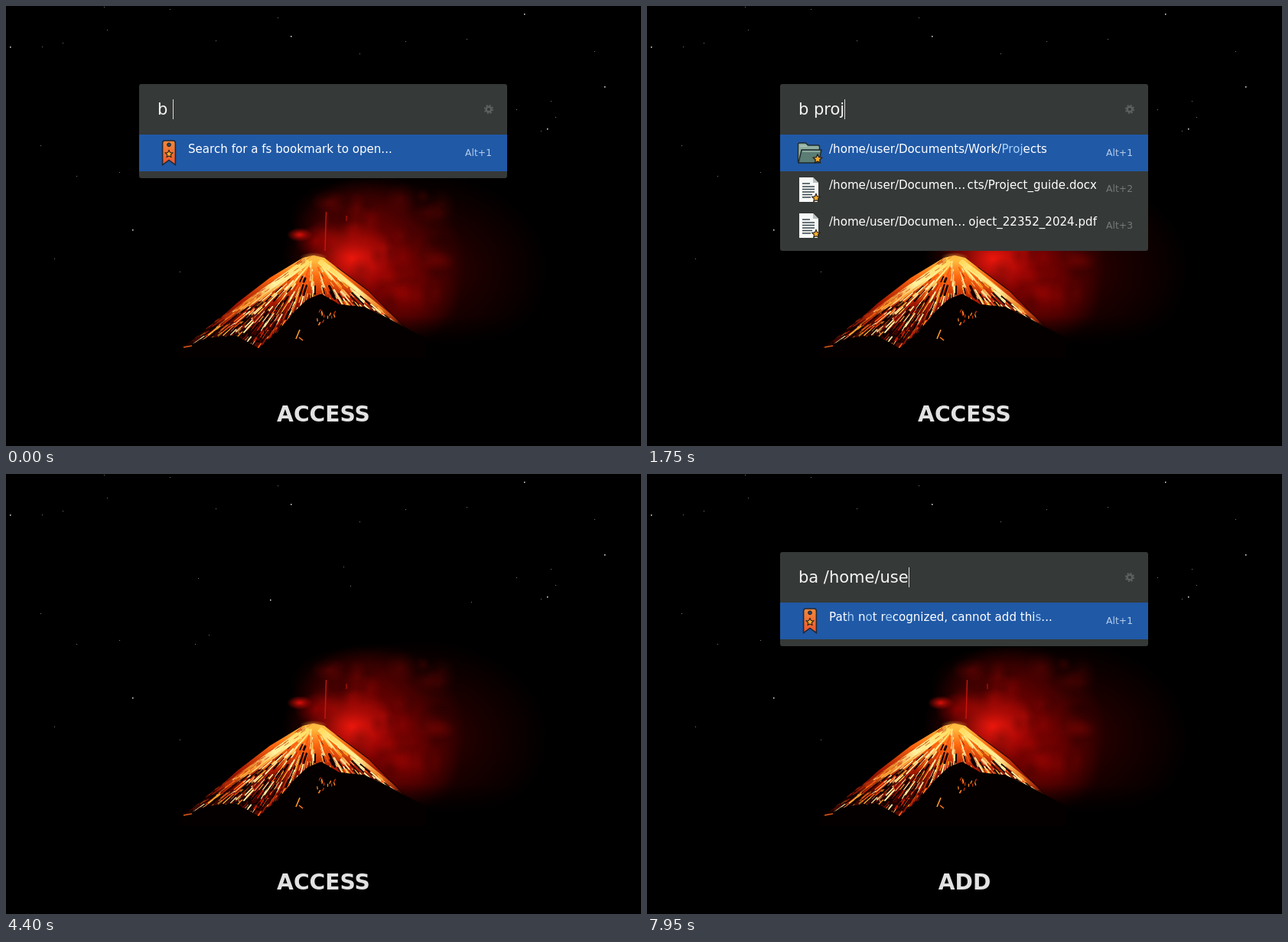
Animation of 830 by 575 pixels, one loop 8000 ms. Source, as an HTML page with a canvas:

```html
<!DOCTYPE html>
<html lang="en">
<head>
<meta charset="utf-8">
<title>Bookmark launcher</title>
<style>
html, body { margin: 0; width: 100%; height: 100%; overflow: hidden; background: #000; }
#stage { position: relative; width: 830px; height: 575px; overflow: hidden; font-family: "DejaVu Sans", sans-serif; color: #fff; }
canvas, #panel, #query, #gear, .row > *, #files, .file, .file > *, #caption { position: absolute; }
#query, .row span, .file p { white-space: pre; }
[hidden] { display: none; }
#panel { left: 174px; top: 102px; width: 481px; padding: 66px 0 9px; border-radius: 3px; background: #353938; overflow: hidden; }
#query { left: 24px; top: 18px; font-size: 21px; line-height: 30px; color: #f4f4f4; }
#query::after { content: ""; display: inline-block; width: 1.2px; height: 26px; margin-right: -2px; vertical-align: -6px; background: #d8dad9; }
#gear { left: 450px; top: 26px; }
.row { position: relative; height: 47.6px; font-size: 15.1px; line-height: 20px; }
.row:first-child { background: #2059a6; }
.row svg { left: 22px; top: 7px; width: 34px; height: 34px; }
.row .path { left: 64px; top: 8.6px; }
.row .tail { right: 67px; top: 8.6px; }
.row .key { left: 426px; top: 13.6px; font-size: 12.4px; color: #747978; }
.row:first-child .key { color: #b4cdec; }
.row b { font-weight: normal; color: #a5d0f8; }
#files { inset: 0; background: linear-gradient(125deg, #161417 45%, #171512); }
.file { top: 0; width: 104px; }
.file svg { left: 0; top: 0; }
.file p { margin: 0; left: 0; width: 104px; top: 78.6px; text-align: center; font-size: 12.4px; line-height: 15.4px; }
#caption { left: 0; top: 514px; width: 830px; text-align: center; font-size: 28.2px; font-weight: bold; line-height: 40px; color: #e2e2e2; }
</style>
</head>
<body>
<svg width="0" height="0" style="position:absolute">
  <defs>
    <linearGradient id="ribbon" x2="0" y2="1">
      <stop stop-color="#f28a3c"/><stop offset="1" stop-color="#f0552f"/>
    </linearGradient>
    <polygon id="star" points="0,-5 1.5,-1.9 4.8,-1.5 2.3,.8 2.9,4 0,2.4 -2.9,4 -2.3,.8 -4.8,-1.5 -1.5,-1.9" fill="#fbae2c" stroke="#26211c" stroke-width="1.1"/>
    <symbol id="bookmark" viewBox="0 0 34 34">
      <path d="M8.6 4q0-3 3-3h10.8q3 0 3 3v28.6L17 26.4l-8.4 6.2z" fill="url(#ribbon)" stroke="#202a38" stroke-width="1.6"/>
      <circle cx="17" cy="6.3" r="2.4" fill="#2c4560" stroke="#202020"/>
      <use href="#star" x="17" y="18.5"/>
    </symbol>
    <symbol id="folder" viewBox="0 0 34 34">
      <path d="M1.5 28V6q0-2 2-2h8l3 3h13q2 0 2 2v19z" fill="#8fae9f" stroke="#1e2a2c" stroke-width="1.4"/>
      <path d="M2 30L6 13h26l-3.5 17z" fill="#5b7d74" stroke="#1e2a2c" stroke-width="1.4"/>
      <path d="M7 15h23M4 8h9" stroke="#b9d3c5"/>
      <use href="#star" transform="translate(27 25) scale(1.2)"/>
    </symbol>
    <symbol id="doc" viewBox="0 0 34 34">
      <path d="M3 1h18l7 7v25H3z" fill="#f7f8f8"/>
      <path d="M21 1v7h7z" fill="#b9c0c3"/>
      <path d="M7 9h10M7 13h16M7 16.5h16M7 20h16M7 23.5h13M7 27h11" stroke="#38454c" stroke-width="1.5"/>
      <use href="#star" transform="translate(25 28) scale(1.1)"/>
    </symbol>
  </defs>
</svg>
<div id="stage">
  <canvas id="scene" width="830" height="575"></canvas>
  <div id="panel">
    <div id="query"></div>
    <svg id="gear" width="14" height="14" viewBox="-7 -7 14 14" fill="none" stroke="#5c6160">
      <circle r="3.3" stroke-width="2.4"/><circle r="5.2" stroke-width="1.8" stroke-dasharray="2.04"/>
    </svg>
    <div id="rows"></div>
  </div>
  <div id="files" hidden></div>
  <div id="caption"></div>
</div>
<script>
const $ = id => document.getElementById(id);

function random(seed) {
  return () => (seed = (seed * 16807) % 2147483647) / 2147483647;
}

// ---------- night sky and volcano ----------
const STARS = [5,53, 355,15, 372,39, 274,45, 677,10, 782,105, 712,124, 707,160, 699,163, 667,135, 345,164,
  251,136, 450,146, 165,292, 227,347, 92,222, 148,217, 265,210, 247,222, 602,43, 769,59, 47,53, 74,48,
  132,31, 214,4, 128,1, 63,330, 45,182, 441,121, 608,167, 718,145, 462,62, 522,46];
const BRIGHT = new Set([5, 677, 782, 707, 345, 372, 165]);
const LAVA = [402,326, 388,329, 345,355, 302,388, 272,415, 232,446, 262,434, 300,430, 330,447, 354,427,
  374,402, 394,383, 412,376, 436,390, 468,393, 500,408, 521,420, 474,373, 434,343, 416,329];
const CONE = [402,327, 434,342, 474,372, 522,420, 548,434, 548,460, 225,460, 225,447, 300,392];

function drawScene() {
  const g = $('scene').getContext('2d');
  const rnd = random(71);
  const trace = pts => {
    g.beginPath();
    for (let i = 0; i < pts.length; i += 2) g.lineTo(pts[i], pts[i + 1]);
    g.closePath();
  };
  const glow = (x, y, rx, ry, rgb, a) => {
    g.save();
    g.translate(x, y);
    g.scale(rx, ry);
    const fill = g.createRadialGradient(0, 0, 0, 0, 0, 1);
    fill.addColorStop(0, `rgba(${rgb},${a})`);
    fill.addColorStop(.5, `rgba(${rgb},${a * .45})`);
    fill.addColorStop(1, `rgba(${rgb},0)`);
    g.fillStyle = fill;
    g.fillRect(-1, -1, 2, 2);
    g.restore();
  };
  const streak = (x1, y1, x2, y2, color, width) => {
    g.strokeStyle = color;
    g.lineWidth = width;
    g.beginPath();
    g.moveTo(x1, y1);
    g.lineTo(x2, y2);
    g.stroke();
  };

  g.fillStyle = '#000';
  g.fillRect(0, 0, 830, 575);
  for (let i = 0; i < STARS.length; i += 2) {
    const big = BRIGHT.has(STARS[i]);
    g.fillStyle = big ? '#e8e8e8' : '#777';
    g.fillRect(STARS[i], STARS[i + 1], big ? 1.5 : 1, big ? 1.5 : 1);
  }

  // smoke
  glow(540, 345, 170, 130, '100,0,0', .55);
  glow(480, 340, 120, 120, '185,2,2', .75);
  glow(452, 330, 60, 50, '255,26,14', .85);
  glow(455, 275, 85, 50, '125,0,0', .5);
  glow(525, 385, 70, 60, '130,0,0', .5);
  glow(384, 299, 17, 9, '225,15,8', 1);
  glow(405, 308, 28, 22, '170,2,0', .65);
  for (let i = 0; i < 60; i++) {
    const spread = rnd();
    glow(415 + spread * 160, 245 + rnd() * 150, 9 + rnd() * 18, 9 + rnd() * 15,
      i % 2 ? '0,0,0' : '210,12,5', .1 + .14 * (1 - spread));
  }
  const ground = g.createLinearGradient(0, 405, 0, 445);
  ground.addColorStop(0, 'rgba(0,0,0,0)');
  ground.addColorStop(1, '#000');
  g.fillStyle = ground;
  g.fillRect(360, 405, 360, 80);
  streak(418.5, 269, 417, 320, '#c8160c', 1.4);
  streak(445, 274, 445, 281, '#b01008', 1.3);

  g.fillStyle = '#040000';
  trace(CONE);
  g.fill();

  // lava
  g.save();
  trace(LAVA);
  g.clip();
  const heat = g.createLinearGradient(0, 327, 0, 446);
  heat.addColorStop(0, '#ffd24a');
  heat.addColorStop(.22, '#ff6a10');
  heat.addColorStop(.5, '#a81a02');
  heat.addColorStop(.8, '#380300');
  heat.addColorStop(1, '#500a00');
  g.fillStyle = heat;
  g.fillRect(225, 320, 300, 130);
  g.lineCap = 'round';
  for (let i = 0; i < 900; i++) {
    const v = .04 + .94 * Math.sqrt(rnd()), u = rnd(), right = rnd() < .3;
    const dx = right ? 22 + u * 100 : -172 + u * 172;
    const dy = right ? 96 : 120;
    const len = (4 + rnd() * 17) / Math.hypot(dx, dy);
    const x = 402 + dx * v + (rnd() - .5) * 6, y = 327 + dy * v;
    const dark = rnd() < (v - .1) * (right ? .5 : .72);
    const hot = rnd() * 1.25 - v * .7 + (right ? u * .25 : (1 - u) * .2);
    const color = dark ? '#140000' : hot > .5 ? '#fff2a8' : hot > .22 ? '#ffb42e' : hot > -.05 ? '#ff5a10' : '#b81e04';
    streak(x, y, x + dx * len, y + dy * len, color, .6 + rnd() * (dark ? 2.4 : 1.3));
  }
  const rim = (x1, y1, x2, y2, width) => {
    const fade = g.createLinearGradient(x1, y1, x2, y2);
    fade.addColorStop(0, '#ffdc60');
    fade.addColorStop(.35, '#fff3a0');
    fade.addColorStop(.65, 'rgba(255,150,35,.8)');
    fade.addColorStop(1, 'rgba(230,50,10,0)');
    streak(x1, y1, x2, y2, fade, width);
  };
  rim(392, 334, 274, 418, 8);
  rim(398, 334, 310, 400, 2.5);
  rim(396, 338, 350, 392, 2);
  rim(412, 335, 474, 382, 7);
  rim(425, 344, 522, 421, 5);
  rim(410, 336, 452, 386, 2);
  g.restore();

  // sparks outside the flow
  for (let i = 0; i < 50; i++) {
    const v = rnd(), x = 393 - v * 130 + rnd() * 8, y = 331 + v * 92 - rnd() * 6;
    streak(x, y, x - 6, y + 4, '#c8320a', .7);
  }
  for (let i = 0; i < 14; i++) {
    const x = 406 + rnd() * 26, y = 394 + rnd() * 20;
    streak(x, y, x + 2 - rnd() * 5, y + 4, i % 2 ? '#ff8a24' : '#c33408', 1.3);
  }
  streak(384, 423, 379, 435, '#ff9a2c', 1.6);
  streak(383, 433, 388, 437, '#ff7a1c', 1.6);
  streak(232, 446, 243, 444, '#e0561a', 1.3);
  glow(402, 328, 18, 6, '255,170,60', .7);
}

// ---------- file window ----------
const FILES = ['2022.tar.xz', '2023.tar.xz', 'P_26144.p\ndf', 'P_26456.p\ndf', 'Project_33\n63_2024.p\ndf',
  'Project_88\n16_2024.p\ndf', 'Project_18\n089_2024.\npdf', 'Project_22\n352_2024.\npdf'];

const archive = () => `<rect x="28.5" y="22" width="47.5" height="48" rx="5" fill="#47c64a"/>
  <path d="M51.5 22v25" stroke="#fff" stroke-width="6"/>
  <path d="M50 22v24M53 24v22" stroke="#245c50" stroke-width="3" stroke-dasharray="2.5"/>
  <path d="M48.5 44h6l2.5 13q0 5-5.5 5t-5.5-5z" fill="#fff"/>
  <circle cx="51.5" cy="56" r="3" fill="none" stroke="#47c64a" stroke-width="1.3"/>
  <path d="M51.5 45v5" stroke="#333"/>`;

function page(index) {
  const rnd = random(500 + index * 97);
  const plain = index < 4;
  let lines = '';
  for (let y = 32; y < (plain ? 64 : 57); y += 3) {
    const indent = rnd() * 5;
    lines += `<path d="M${37 + indent} ${y}H${67 - rnd() * 5}" stroke="#b5b5b8" stroke-width=".8" stroke-dasharray="${1 + rnd() * 2} ${1 + rnd() * 2}"/>`;
  }
  return `<rect x="32.5" y="18" width="39" height="55.5" rx="1" fill="#fdfdfd"/>
    <rect x="36" y="21" width="2" height="2" fill="#b88"/>
    <path d="M40 22.5h5M60 22.5h7" stroke="#bbb" stroke-width=".8"/>
    <path d="M47 27.5h10" stroke="#555" stroke-width="1.2"/>${lines}` +
    (plain ? '<path d="M36 67.5h6M62 67.5h6" stroke="#555"/>' : '');
}

function buildFiles() {
  $('files').innerHTML = FILES.map((name, i) => `<div class="file" style="left:${(-3.5 + i * 103.65).toFixed(1)}px">
    <svg width="104" height="76">${i < 2 ? archive() : page(i)}</svg><p>${name}</p></div>`).join('');
}

// ---------- launcher ----------
const mark = (text, hits) => [...text].map((c, i) => hits.includes(i) ? `<b>${c}</b>` : c).join('');

const prompt = () => [['bookmark', 'Search for a fs bookmark to open...']];

function found(query) {
  const text = '/home/user/Documents/Work/Projects';
  const hits = [...query.slice(2)].map((c, i) => text.indexOf('Projects') + i);
  return [
    ['folder', mark(text, hits)],
    ['doc', '/home/user/Documen…', 'cts/Project_guide.docx'],
    ['doc', '/home/user/Documen…', 'oject_22352_2024.pdf']
  ];
}

const broad = query => [...found(query),
  ['folder', '/home/user/Documents/Work/Prints'],
  ['folder', '/home/user/Documents/Private'],
  ['doc', '/home/user/Documents/prices.docx'],
  ['folder', '/home/user/Pictures']];

function invalid(query) {
  const text = 'Path not recognized, cannot add this...';
  const hits = [];
  if (query.includes('h')) hits.push(text.indexOf('h'));
  if (query.includes('o')) hits.push(text.indexOf('o'));
  if (query.includes('s')) hits.push(text.indexOf('e'), text.lastIndexOf('s'));
  return [['bookmark', mark(text, hits)]];
}

// time, query (null hides the launcher), result list, file window open
const STEPS = [
  [0, 'b ', prompt], [850, 'b p', prompt], [1200, 'b pr', broad], [1450, 'b pro', found], [1700, 'b proj', found],
  [2400, null], [2700, null, null, true], [4000, null],
  [4600, 'ba ', invalid], [5300, 'ba /', invalid], [5600, 'ba /h', invalid], [5850, 'ba /ho', invalid],
  [6050, 'ba /hom', invalid], [6300, 'ba /home', invalid], [6650, 'ba /home/', invalid],
  [7100, 'ba /home/u', invalid], [7450, 'ba /home/us', invalid], [7900, 'ba /home/use', invalid]
];
const LOOP = 8000;

function show([time, query, results, open]) {
  $('caption').textContent = time < 4600 ? 'ACCESS' : 'ADD';
  $('files').hidden = !open;
  $('panel').hidden = query === null;
  if (query === null) return;
  $('query').textContent = query;
  $('rows').innerHTML = results(query).map(([icon, path, tail = ''], i) => `<div class="row">
    <svg><use href="#${icon}"/></svg><span class="path">${path}</span><span class="tail">${tail}</span>
    <span class="key">Alt+${i + 1}</span></div>`).join('');
}

let current;
function tick() {
  const t = performance.now() % LOOP;
  const step = STEPS.findLast(s => s[0] <= t);
  if (step !== current) show(current = step);
  requestAnimationFrame(tick);
}

drawScene();
buildFiles();
tick();
</script>
</body>
</html>
```
